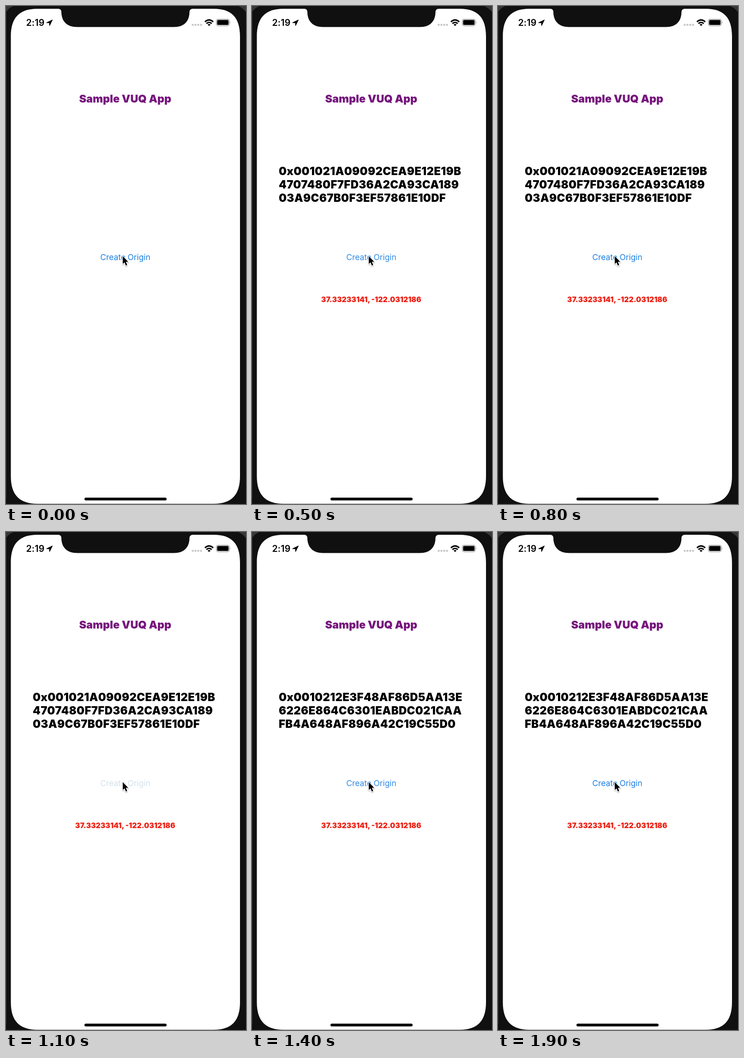
These frames come from a looping animation (520x1078 px, 2000 ms). An HTML page:

```html
<!DOCTYPE html>
<html lang="en">
<head>
<meta charset="utf-8">
<title>Sample app</title>
<style>
  html, body { margin: 0; width: 100%; height: 100%; overflow: hidden; background: #101010; }
  svg { display: block; width: 100%; height: 100%; }
  text { font-family: Inter, "Noto Sans", sans-serif; }
  .clock { font-size: 19.6px; font-weight: 600; letter-spacing: .15px; }
  .title { font-size: 23.4px; font-weight: 900; fill: #76157c; }
  .hash { font-size: 23.8px; font-weight: 900; letter-spacing: .42px; }
  .button { font-size: 17.4px; letter-spacing: -.05px; }
  .place { font-size: 15.8px; font-weight: 900; fill: #ee2013; }
  .middle { text-anchor: middle; }

  .button, .hash, .place { animation: 2s step-end infinite; }
  .button { animation-name: press; }
  .first { animation-name: first; }
  .second { animation-name: second; }
  .place { animation-name: located; }

  @keyframes press {
    0%, 40%, 95%, 100% { fill: #1c7fe2; }
    20%, 55% { fill: #d3e2eb; }
    25%, 70% { fill: #308be5; }
    30%, 75% { fill: #2786e4; }
    35%, 80% { fill: #2182e3; }
  }
  @keyframes first {
    0% { opacity: 0; }
    25% { opacity: 1; }
    70%, 100% { opacity: 0; }
  }
  @keyframes second {
    0% { opacity: 0; }
    70%, 100% { opacity: 1; }
  }
  @keyframes located {
    0% { opacity: 0; }
    25%, 100% { opacity: 1; }
  }
</style>
</head>
<body>
<svg viewBox="0 0 520 1078" preserveAspectRatio="none">
  <defs>
    <filter id="shadow" x="-50%" y="-50%" width="200%" height="200%">
      <feDropShadow dx="0" dy="1.5" stdDeviation="1.2" flood-opacity=".35"/>
    </filter>
  </defs>

  <!-- Phone body and screen -->
  <rect width="520" height="1078" fill="#101010"/>
  <path d="M0 0H16Q6 4 0 13ZM520 0H503Q513 4 520 13Z" fill="#373839"/>
  <path d="M.5 13V1065" stroke="#292929"/>
  <path fill="#fff" d="M10.5 66C10.5 25 29 6 68 6H113Q120 6 120 14C120.5 34 133 45.5 154 45.5H364C385 45.5 397 34 397.5 14Q397.500 6 405 6H450C489 6 507 25 507 66V1018C507 1058 489 1077.5 450 1077.500H68C29 1077.500 10.500 1058 10.500 1018Z"/>
  <rect x="170" y="1064.200" width="178" height="6" rx="3"/>

  <!-- Status bar -->
  <text class="clock" x="43.500" y="43">2:19</text>
  <path d="M100.500 29.500L87.500 35.800Q87 36.600 88 36.800L93.600 36.900L93.700 42.300Q94.200 43.400 95 42.400L101 30.200Q101.100 29.400 100.500 29.500Z"/>
  <path d="M404.500 40.800h18.100" stroke="#c6c6c8" stroke-width="4.600" stroke-linecap="round" stroke-dasharray="0 6"/>
  <g fill="none" stroke="#000" stroke-width="3">
    <path d="M431 34.300Q440 26 449 34.300"/>
    <path d="M434.300 38Q440 33 445.700 38"/>
  </g>
  <path d="M436.800 40.200Q440 37.600 443.200 40.200L440 43.300Z"/>
  <rect x="455.700" y="28.600" width="28.200" height="14.200" rx="3.800" fill="none" stroke="#8e8e8e" stroke-width="1.200"/>
  <rect x="457.400" y="30.300" width="24.800" height="10.800" rx="2.200"/>
  <path d="M485.300 33.500Q487.300 35.700 485.300 38Z" fill="#8e8e8e"/>

  <!-- App content -->
  <text class="title middle" x="258.300" y="209">Sample VUQ App</text>
  <text class="hash first">
    <tspan x="58" y="366.400">0x001021A09092CEA9E12E19B</tspan>
    <tspan x="58" y="395">4707480F7FD36A2CA93CA189</tspan>
    <tspan x="58" y="423.600">03A9C67B0F3EF57861E10DF</tspan>
  </text>
  <text class="hash second">
    <tspan x="58" y="366.400">0x0010212E3F48AF86D5AA13E</tspan>
    <tspan x="58" y="395">6226E864C6301EABDC021CAA</tspan>
    <tspan x="58" y="423.600">FB4A648AF896A42C19C55D0</tspan>
  </text>
  <text class="button middle" x="258.500" y="550">Create Origin</text>
  <text class="place middle" x="258.300" y="641">37.33233141, -122.0312186</text>

  <!-- Pointer -->
  <path d="M253 541.500V558.300L256.800 554.900L259.700 561.800L262.600 560.500L259.700 553.800H264.800Z" stroke="#fff" stroke-width="2.400" stroke-linejoin="round" paint-order="stroke" filter="url(#shadow)"/>
</svg>
</body>
</html>
```
